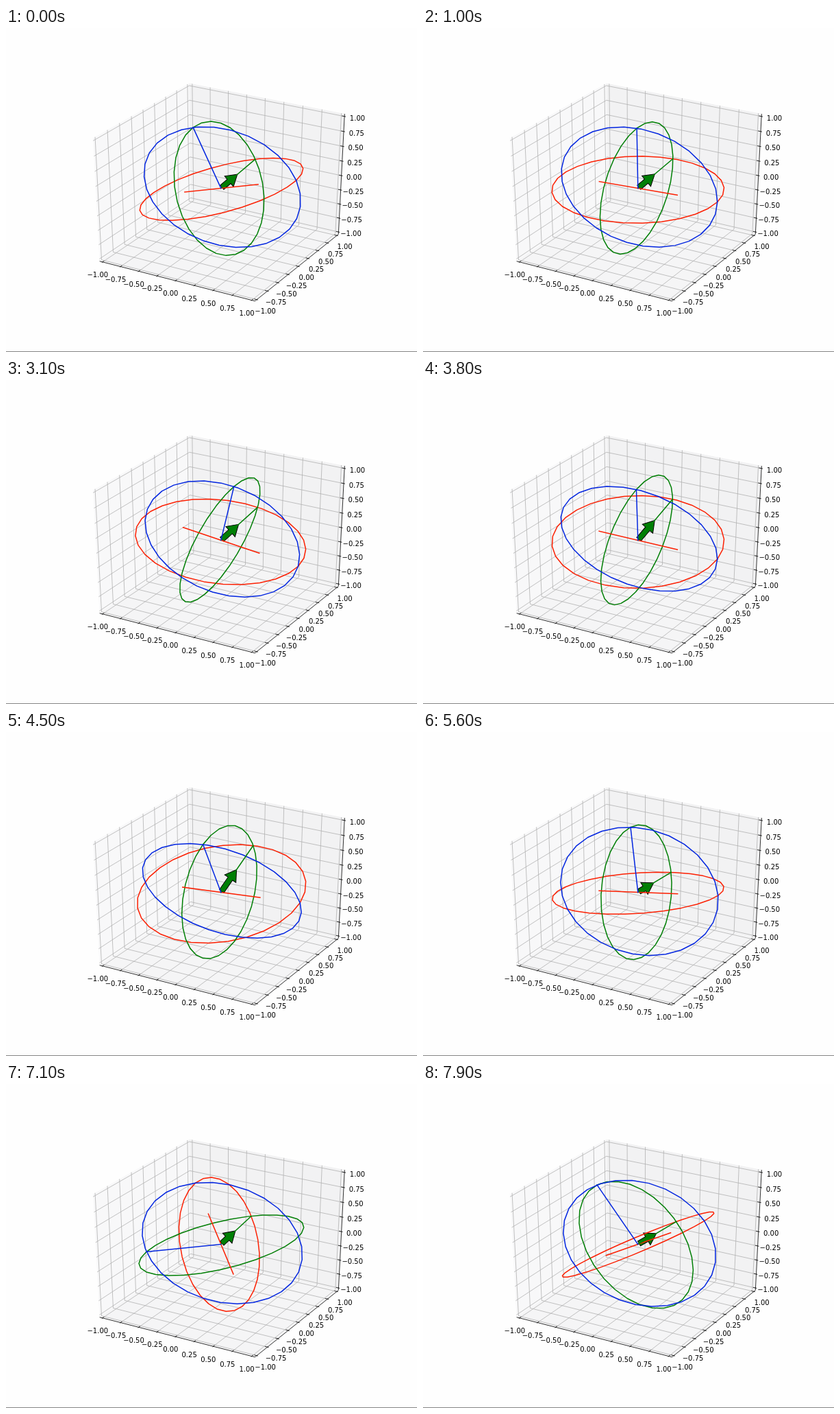
Animation, 600 px wide and 472 px high, one loop 8000 ms. Source, as an HTML page with a canvas:

```html
<!DOCTYPE html>
<html>
<head>
<meta charset="utf-8">
<style>
html, body { margin: 0; width: 100%; height: 100%; overflow: hidden; background: #fefefe; }
canvas { display: block; }
</style>
</head>
<body>
<canvas id="stage" width="600" height="472"></canvas>
<script>
const ctx = document.getElementById('stage').getContext('2d');
const RED = '#fc2003', GREEN = '#007f05', BLUE = '#0225e0';
const E = 1 + 1 / 24;              // panes reach a little past the data limits
const SEGMENTS = 29;
const LOOP = 8000, STEP = 100;

// time, yaw, pitch, roll (degrees)
const POSES = [
  [0, 5.5, -0.5, 20.7],
  [1900, 4.5, 0.7, -9.6],
  [2500, 4, 1.5, -6.5],
  [3100, 3.7, 4, -11.4],
  [4500, 5.9, 19, 4.3],
  [5600, 6, -9.5, 9.5],
  [7100, 8.5, -2, 109],
  [7900, 2.2, -6, 35.4]
];

// Perspective view: elevation 30, azimuth -60, box of side 1, distance 10
const C = Math.sqrt(3) / 2;
function project([x, y, z]) {
  const u = C * x + 0.5 * y;
  const v = -0.25 * x + C / 2 * y + C * z;
  const w = C / 2 * x - 0.75 * y + 0.5 * z;
  const k = 0.5 / (10 - 0.5 * w);
  return [313.78 + 2513.5 * k * u, 233.45 - 1964.5 * k * v];
}

function trace(points) {
  ctx.beginPath();
  points.forEach(p => ctx.lineTo(...p));
}

function line(points, color, width) {
  trace(points.map(project));
  ctx.strokeStyle = color;
  ctx.lineWidth = width;
  ctx.stroke();
}

function pane(points, color) {
  trace(points.map(project));
  ctx.fillStyle = color;
  ctx.fill();
}

const scale = (a, s) => a.map(x => x * s);
const mix = (a, s, b, t) => a.map((x, i) => x * s + b[i] * t);

// Point at value v of axis k, with the other two coordinates at distance e
const onAxis = (k, v, e) => [[v, -e, -e], [e, v, -e], [e, e, v]][k];

const gridLine = (k, v) => [
  [[v, E, E], [v, E, -E], [v, -E, -E]],
  [[-E, v, E], [-E, v, -E], [E, v, -E]],
  [[-E, -E, v], [-E, E, v], [E, E, v]]
][k];

function drawTick(k, v) {
  const tickDir = k === 0 ? 1 : 0, sign = k === 0 ? -1 : 1;
  const inner = onAxis(k, v, E), outer = onAxis(k, v, E);
  inner[tickDir] -= sign / 30;
  outer[tickDir] += sign / 60;
  line([inner, outer], '#000', 0.8);

  const [x, y] = project(onAxis(k, v, E + 0.111));
  ctx.fillText((v < 0 ? '\u2212' : '') + Math.abs(v).toFixed(2), x, y + 7.8);
}

function drawAxes() {
  ctx.fillStyle = '#fefefe';
  ctx.fillRect(0, 0, 600, 472);
  ctx.fillStyle = '#858585';
  ctx.fillRect(0, 471, 600, 1);

  pane([[-E, -E, -E], [-E, E, -E], [-E, E, E], [-E, -E, E]], '#f8f8f9');
  pane([[-E, E, -E], [E, E, -E], [E, E, E], [-E, E, E]], '#f2f2f3');
  pane([[-E, -E, -E], [E, -E, -E], [E, E, -E], [-E, E, -E]], '#f5f5f6');

  const ticks = Array.from({ length: 9 }, (_, i) => i / 4 - 1);
  ctx.lineCap = 'butt';
  ctx.lineJoin = 'round';
  for (let k = 0; k < 3; k++) ticks.forEach(v => line(gridLine(k, v), '#b2b2b2', 0.8));

  ctx.font = '10px "DejaVu Sans", sans-serif';
  ctx.textAlign = 'center';
  for (let k = 0; k < 3; k++) {
    line([onAxis(k, -E, E), onAxis(k, E, E)], '#000', 0.8);
    ticks.forEach(v => {
      ctx.fillStyle = '#000';
      drawTick(k, v);
    });
  }
}

// Slope at a key: level at turning points, so the curve never overshoots
function slope(i, c) {
  const rate = j => (POSES[j + 1][c] - POSES[j][c]) / (POSES[j + 1][0] - POSES[j][0]);
  if (i === 0) return rate(0);
  if (i === POSES.length - 1) return rate(i - 1);
  const a = rate(i - 1), b = rate(i);
  return a * b > 0 ? 2 * a * b / (a + b) : 0;
}

function angle(t, c) {
  let i = 0;
  while (i < POSES.length - 2 && t >= POSES[i + 1][0]) i++;
  const p = POSES[i], q = POSES[i + 1];
  const h = q[0] - p[0], s = (t - p[0]) / h, r = 1 - s;
  const deg = r * r * (1 + 2 * s) * p[c] + s * s * (1 + 2 * r) * q[c]
    + h * s * r * (r * slope(i, c) - s * slope(i + 1, c));
  return deg * Math.PI / 180;
}

function frameAt(t) {
  const [yaw, pitch, roll] = [1, 2, 3].map(c => angle(t, c));
  const { sin, cos } = Math;
  const side = [cos(yaw), sin(yaw), 0];
  const up = [sin(yaw) * sin(pitch), -cos(yaw) * sin(pitch), cos(pitch)];
  return {
    a: mix(side, cos(roll), up, sin(roll)),
    b: mix(up, cos(roll), side, -sin(roll)),
    g: [-sin(yaw) * cos(pitch), cos(yaw) * cos(pitch), sin(pitch)]
  };
}

function circle(p, q, color) {
  const points = [];
  for (let i = 0; i <= SEGMENTS; i++) {
    const f = 2 * Math.PI * i / SEGMENTS;
    points.push(mix(p, Math.cos(f), q, Math.sin(f)));
  }
  line(points, color, 1.5);
}

function arrow(end) {
  const [x0, y0] = project([0, 0, 0]), [x1, y1] = project(end);
  const tip = Math.hypot(x1 - x0, y1 - y0) - 2, neck = tip - 16;
  ctx.save();
  ctx.translate(x0, y0);
  ctx.rotate(Math.atan2(y1 - y0, x1 - x0));
  trace([[2, -4], [neck, -4], [neck, -10], [tip, 0], [neck, 10], [neck, 4], [2, 4]]);
  ctx.closePath();
  ctx.lineJoin = 'miter';
  ctx.lineWidth = 1;
  ctx.strokeStyle = '#000';
  ctx.fillStyle = GREEN;
  ctx.fill();
  ctx.stroke();
  ctx.restore();
}

function draw(now) {
  const t = Math.floor(now % LOOP / STEP) * STEP;
  const { a, b, g } = frameAt(t);
  const origin = [0, 0, 0];
  drawAxes();
  arrow(scale(g, 0.5));
  ctx.lineCap = 'square';
  circle(a, g, RED);
  circle(b, g, GREEN);
  circle(a, b, BLUE);
  line([scale(a, -0.5), scale(a, 0.5)], RED, 1.5);
  line([origin, g], GREEN, 1.5);
  line([origin, b], BLUE, 1.5);
}

const start = performance.now();
function tick() {
  draw(performance.now() - start);
  requestAnimationFrame(tick);
}
tick();
</script>
</body>
</html>
```
